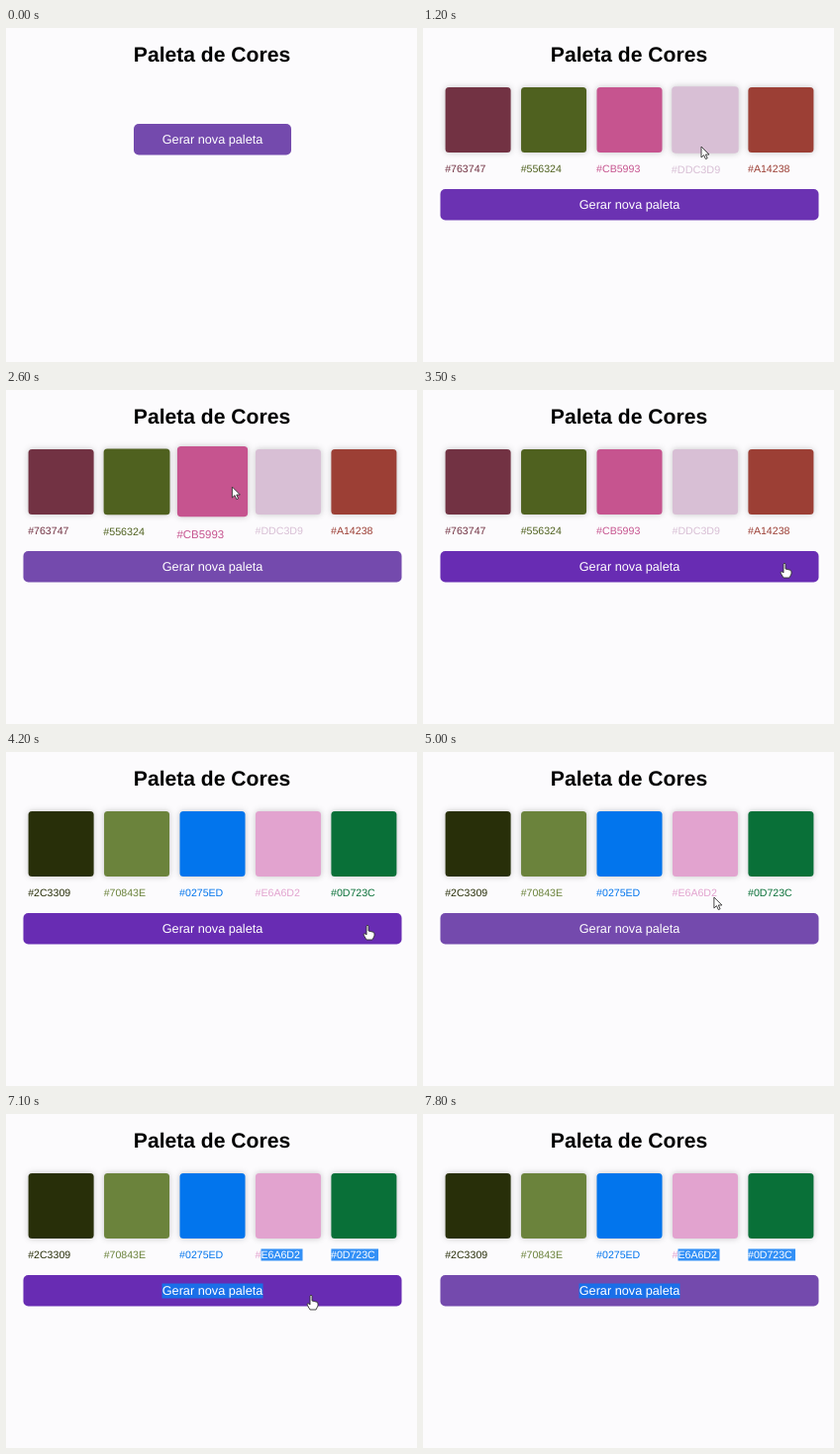
An HTML page that plays this animation: 415x338 px, repeating every 7900 ms.

```html
<!DOCTYPE html>
<html lang="pt">
<head>
<meta charset="utf-8">
<title>Paleta de Cores</title>
<style>
  html, body { margin: 0; width: 100%; height: 100%; overflow: hidden; background: #fcfbfd; }
  svg { display: block; font: 10.6px "Liberation Sans", Arial, sans-serif; text-rendering: geometricPrecision; }
  .title { font-size: 21.1px; font-weight: bold; }
  .action { font-size: 12.7px; fill: #fff; }
  .mid { text-anchor: middle; }
  .swatch { filter: drop-shadow(0 0 3px rgba(0, 0, 0, .22)); }
</style>
</head>
<body>
<svg id="stage" width="415" height="338" viewBox="0 0 415 338"></svg>
<script>
const LOOP = 7900, FADE = 200;
const FIRST = 1140, SECOND = 4100, WORD = 5500, ALL = 5900;
const SELECTED = '#3390f6';

// label, painted colour
const palettes = [
  [['#763747', '#723243'], ['#556324', '#4f611f'], ['#CB5993', '#c6548f'], ['#DDC3D9', '#d8bfd5'], ['#A14238', '#9c3f35']],
  [['#2C3309', '#282f09'], ['#70843E', '#6b833c'], ['#0275ED', '#0275ed'], ['#E6A6D2', '#e2a3cf'], ['#0D723C', '#097038']]
];

// pointer path: time, x, y
const path = [
  [100, 388, 234], [700, 281, 120], [1350, 281, 120], [1500, 278, 100],
  [1900, 60, 95], [2300, 110, 98], [2600, 228, 98], [2950, 355, 100],
  [3200, 365, 168], [3500, 365, 176], [4500, 365, 176], [4800, 325, 164],
  [5000, 294, 147], [5300, 259, 143], [5600, 259, 143], [6100, 302, 154],
  [6500, 302, 154], [6900, 308, 184], [7400, 308, 184]
];

const cardX = i => 22.6 + i * 76.45;
const button = t => t < FIRST ? { x: 129, y: 97, w: 159 } : { x: 17.5, y: 163, w: 382 };

function pointer(t) {
  const k = path.findIndex(p => p[0] > t);
  if (k < 1) return null;
  const [t0, x0, y0] = path[k - 1], [t1, x1, y1] = path[k];
  const u = (t - t0) / (t1 - t0);
  return { x: x0 + (x1 - x0) * u, y: y0 + (y1 - y0) * u };
}

const inside = (p, x, y, w, h) => p && p.x >= x && p.x <= x + w && p.y >= y && p.y <= y + h;

function onButton(t) {
  const b = button(t);
  return inside(pointer(t), b.x, b.y, b.w, 31.5);
}

const onCard = (t, i) => t >= FIRST && inside(pointer(t), cardX(i) - 3, 55, 72, 85);

// Share of the last FADE ms spent hovering, eased
function hover(t, test) {
  const n = 40;
  let sum = 0;
  for (let k = 0; k < n; k++) if (test(t - (k + .5) * FADE / n)) sum++;
  const u = sum / n;
  return u * u * (3 - 2 * u);
}

const highlight = (x, y, w, h, fill) => `<rect x="${x}" y="${y}" width="${w}" height="${h}" fill="${fill}"/>`;

function card([label, color], i, t) {
  const x = cardX(i), cx = x + 33, s = 1 + .1 * hover(t, at => onCard(at, i));
  let mark = '', text = label;
  if (i === 3 && t >= WORD) {
    mark = highlight(257.5, 136.5, 42, 12, SELECTED);
    text = `#<tspan fill="#fff">${label.slice(1)}</tspan>`;
  } else if (i === 4 && t >= ALL) {
    mark = highlight(328.4, 136.5, 47.6, 12, SELECTED);
    text = `<tspan fill="#fff">${label}</tspan>`;
  }
  return `<g fill="${color}" transform="translate(${cx} 97) scale(${s}) translate(${-cx} -97)">
    <rect class="swatch" x="${x}" y="60" width="66" height="66" rx="3.5"/>
    ${mark}<text x="${x - .4}" y="146">${text}</text></g>`;
}

function drawButton(t) {
  const { x, y, w } = button(t), u = hover(t, onButton);
  const mix = (a, b) => Math.round(a + (b - a) * u);
  const fill = `rgb(${mix(116, 104)},${mix(74, 44)},${mix(173, 179)})`;
  const mark = t >= ALL ? highlight(157.5, 171.5, 102, 15, '#1a6fe8') : '';
  return `<rect x="${x}" y="${y}" width="${w}" height="31.5" rx="5" fill="${fill}"/>
    ${mark}<text class="action mid" x="208.5" y="${y + 20}">Gerar nova paleta</text>`;
}

function drawPointer(t) {
  const p = pointer(t);
  if (!p) return '';
  const d = onButton(t)
    ? 'M-1 0Q0-2 1 0V5L5 6Q7 6 7 8V10L5 14H-1L-4 9Q-4 7-2 8L-1 9Z'
    : 'M0 0V11L2.6 8.6L4.4 12.6L6.2 11.8L4.4 8H8Z';
  return `<path transform="translate(${p.x} ${p.y})" d="${d}" fill="#fff" stroke="#333" stroke-width=".9" stroke-linejoin="round"/>`;
}

function draw(now) {
  const t = now % LOOP;
  const cards = t < FIRST ? [] : palettes[t < SECOND ? 0 : 1];
  document.getElementById('stage').innerHTML =
    '<text class="title mid" x="208" y="34">Paleta de Cores</text>' +
    cards.map((c, i) => card(c, i, t)).join('') + drawButton(t) + drawPointer(t);
}

const start = performance.now();
function tick() {
  draw(performance.now() - start);
  requestAnimationFrame(tick);
}
tick();
</script>
</body>
</html>
```
